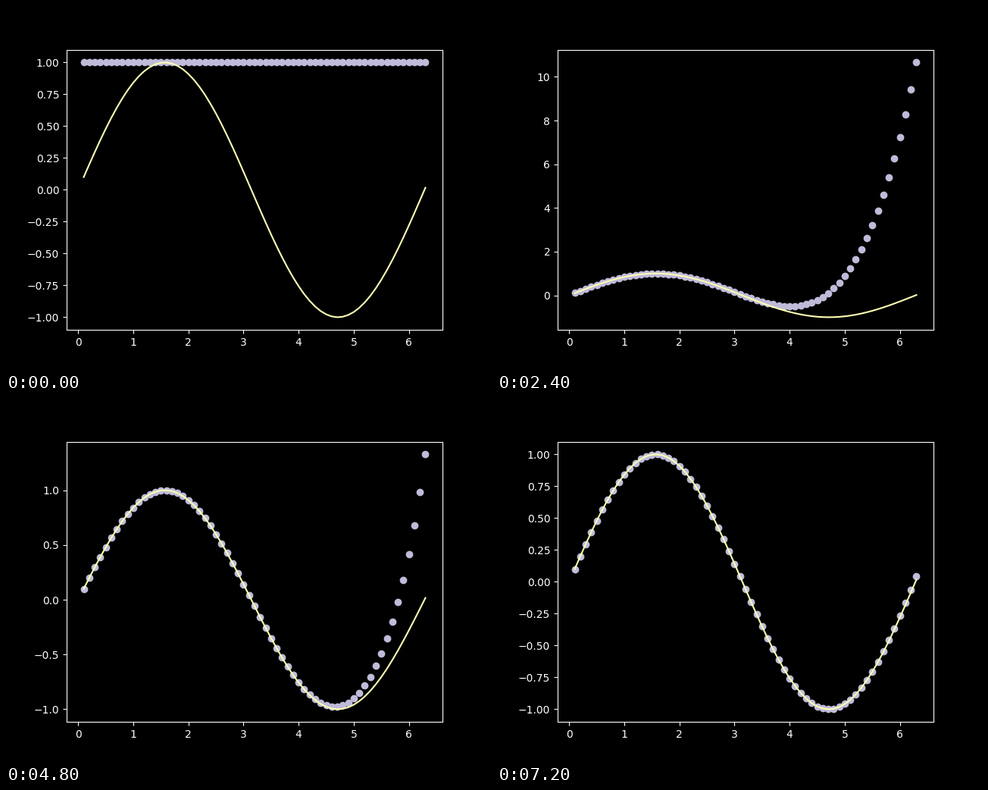
A matplotlib script for the animation above (8 s loop, 640x480 px).

```python
import math

import matplotlib.pyplot as plt
import numpy as np
from matplotlib.animation import FuncAnimation

plt.style.use("dark_background")

INTERVAL = 400
FRAMES = 20
FRAMES_PER_TERM = 3
LINE_COLOR = "#feffb3"
DOT_COLOR = "#bfbbd9"

x = np.arange(1, 64) * 0.1


def taylor_sine(x, terms):
    """Taylor polynomial of sin(x) about pi/2 with its first nonzero terms."""
    d = x - math.pi / 2
    return sum((-1) ** k * d ** (2 * k) / math.factorial(2 * k)
               for k in range(terms))


fig, ax = plt.subplots(figsize=(6.4, 4.8), dpi=100)


def draw(frame):
    # Clearing lets the axis limits and ticks adapt to each polynomial.
    ax.clear()
    ax.plot(x, np.sin(x), color=LINE_COLOR)
    ax.scatter(x, taylor_sine(x, frame // FRAMES_PER_TERM + 1), color=DOT_COLOR)


anim = FuncAnimation(fig, draw, frames=FRAMES, interval=INTERVAL,
                     init_func=lambda: draw(0), repeat=True, repeat_delay=0)
plt.show()
```
